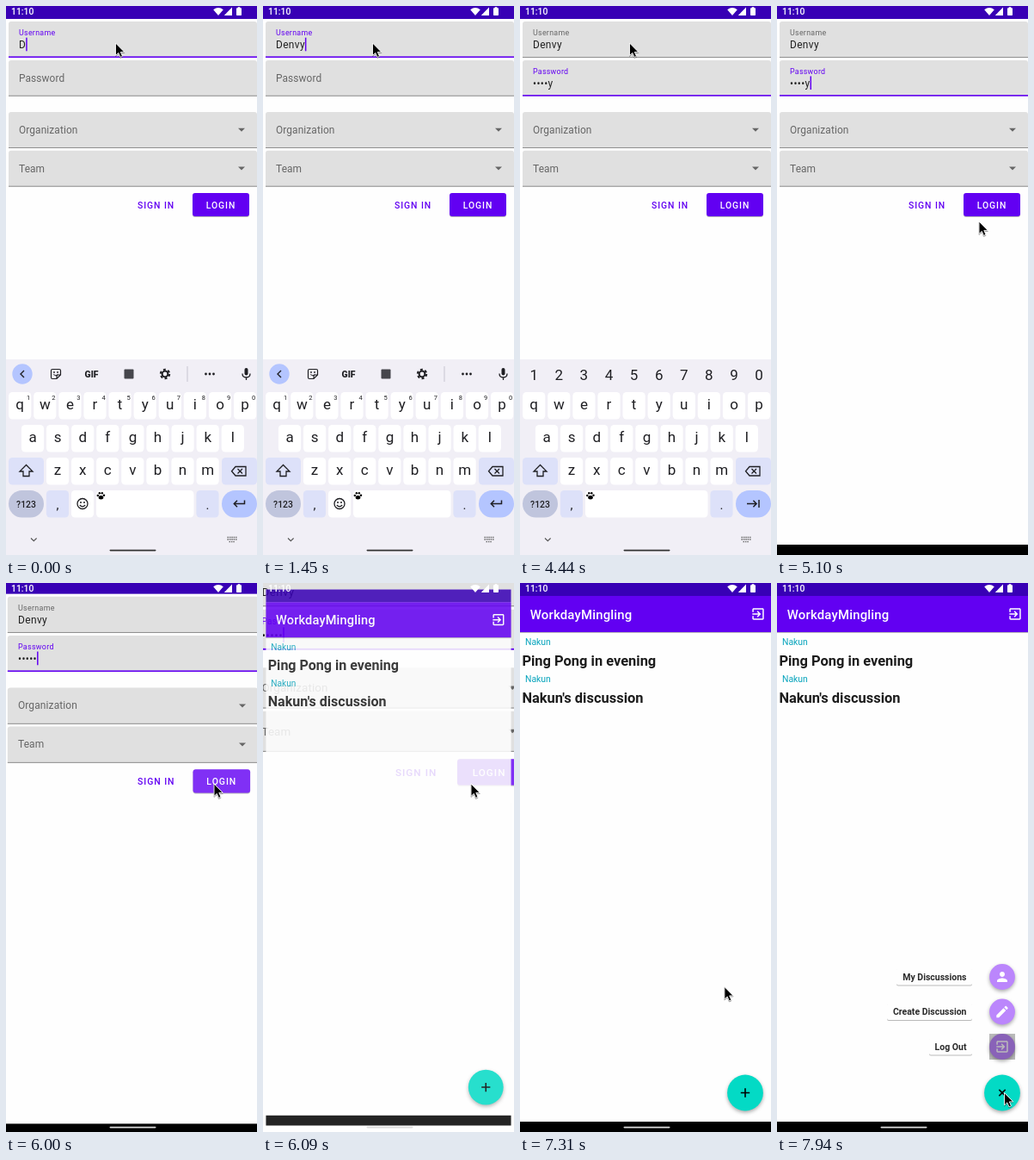
Recreate the animation shown at these times as an HTML page. Size 292x637 px, loop 8000 ms.

```html
<!DOCTYPE html>
<html lang="en">
<head>
<meta charset="utf-8">
<title>Login</title>
<style>
  html, body { margin: 0; width: 100%; height: 100%; overflow: hidden; background: #fefefe; }
  svg { display: block; }
  #stage { font-family: Roboto, sans-serif; }
  text { white-space: pre; }
  .mid { text-anchor: middle; }
  .end { text-anchor: end; }
  .raised { filter: drop-shadow(0 2px 2px #0005); }
  .card { filter: drop-shadow(0 1px .7px #0004); }
</style>
</head>
<body>
<svg id="stage" width="292" height="637" viewBox="0 0 292 637"></svg>
<script>
const LOOP = 8000;
const DP = 0.743;
const PURPLE = '#6200f2', DARK = '#3800b5', TEAL = '#03dac5', LILAC = '#bb86fc';
const INK = '#1f1f23', TONAL = '#dde1f9', BLUE = '#b4c5ff', LETTER_SPACE = 'letter-spacing=".031em"';
const NAME = 'Denvy';
const NAME_KEYS = [0, 260, 1040, 1190, 1450];
const FOCUS = 1720;
const PASS_KEYS = [2500, 2880, 3510, 3660, 3930];
const CURSOR = [
  [0, 127.5, 43], [4650, 127.5, 43], [5060, 235, 250], [5130, 235, 250], [5400, 242, 233],
  [6470, 242, 233], [6660, 190, 234], [6810, 190, 234], [6890, 188, 238],
  [7100, 188, 238], [7450, 264.5, 591.5]
];
const EXIT = 'M10.09 15.59L11.5 17l5-5-5-5-1.41 1.41L12.67 11H3v2h9.67zM19 3H5c-1.1 0-2 .9-2 2v4h2V5h14v14H5v-4H3v4c0 1.1.9 2 2 2h14c1.1 0 2-.9 2-2V5c0-1.1-.9-2-2-2z';
const PERSON = 'M12 12c2.2 0 4-1.8 4-4s-1.8-4-4-4-4 1.8-4 4 1.8 4 4 4zm0 2c-2.7 0-8 1.3-8 4v2h16v-2c0-2.7-5.3-4-8-4z';
const PENCIL = 'M3 17.25V21h3.75L17.8 9.94l-3.75-3.75zM20.7 7c.4-.4.4-1 0-1.4l-2.3-2.3c-.4-.4-1-.4-1.4 0l-1.9 1.8 3.75 3.75z';

const text = (x, y, size, str, attrs = '') =>
  `<text x="${x}" y="${y}" font-size="${size}" ${attrs}>${str}</text>`;
const rect = (x, y, w, h, fill, r = 0, attrs = '') =>
  `<rect x="${x}" y="${y}" width="${w}" height="${h}" fill="${fill}" rx="${r}" ${attrs}/>`;
const disc = (x, y, r, fill, attrs = '') =>
  `<circle cx="${x}" cy="${y}" r="${r}" fill="${fill}" ${attrs}/>`;
const line = (d, width = 1.4, color = INK) =>
  `<path d="${d}" fill="none" stroke="${color}" stroke-width="${width}"/>`;
const icon = (d, cx, cy, fill = '#fff') =>
  `<path d="${d}" fill="${fill}" transform="translate(${cx - 12 * DP} ${cy - 12 * DP}) scale(${DP})"/>`;
const group = (id, body, attrs = '') => `<g id="${id}" ${attrs}>${body}</g>`;

// Login screen
const box = (y, id) =>
  `<path d="M3 ${y + 42}V${y + 3}q0-3 3-3H289q3 0 3 3V${y + 42}z" fill="#e0e0e0"/>` +
  rect(3, y + 41, 289, 1, '#8f8f8f', 0, id ? `id="${id}"` : '');
const dropdown = (y, label) => box(y) +
  text(15, y + 24.8, 11.9, label, 'fill="#666" letter-spacing=".009em"') +
  `<path d="M270 ${y + 18.8}h8l-4 4z" fill="#666"/>`;

const login =
  rect(-20, -20, 332, 677, '#fefefe') + rect(-20, -20, 332, 35, DARK) +
  box(18, 'nameLine') + text(15, 34, 8.9, 'Username', `id="nameLabel" ${LETTER_SPACE}`) +
  text(15, 49, 11.9, '', `id="nameText" fill="#212121" ${LETTER_SPACE}`) +
  box(63, 'passLine') + text(15, 88, 11.9, 'Password', 'id="passLabel"') +
  text(15, 93.8, 11.9, '', `id="passText" fill="#212121" ${LETTER_SPACE}`) +
  rect(15, 36.7, 1.5, 15.6, PURPLE, 0, 'id="caret"') +
  dropdown(123, 'Organization') + dropdown(167.7, 'Team') +
  text(153, 234.7, 10.4, 'SIGN IN', `fill="${PURPLE}" font-weight="500" letter-spacing=".93"`) +
  rect(217, 217, 66, 27, PURPLE, 3, 'class="card"') +
  `<svg x="217" y="217" width="66" height="27">${disc(25, 16, 0, '#fff', 'id="ripple" opacity=".19"')}</svg>` +
  text(232.7, 234.7, 10.4, 'LOGIN', 'fill="#fff" font-weight="500" letter-spacing=".93"') +
  rect(-20, 625, 332, 40, '#000');

// Keyboard
const key = (cx, y, w, fill = '#fff', r = 4.5) => rect(cx - w / 2, y, w, 31.5, fill, r);
const letters = (str, x, y) => [...str].map((c, i) =>
  key(x + i * 29.1, y, 26.2) + text(x + i * 29.1, y + 20, 17, c, `class="mid" fill="${INK}"`)).join('');
const digits = (dx, y, size) => [...'1234567890'].map((c, i) =>
  text(16.2 + i * 29.1 + dx, y, size, c, `class="mid" fill="${INK}"`)).join('');
const paw = (x, y) => `<ellipse cx="${x + .5}" cy="${y + 2.2}" rx="2.8" ry="2.2"/>` +
  [[-3.2, 0], [-1.2, -2.8], [1.8, -2.8], [4, -.3]].map(([a, b]) => disc(x + a, y + b, 1.2, '#000')).join('');
const gear = disc(185, 427, 3.4, 'none', `stroke="${INK}" stroke-width="2"`) +
  disc(185, 427, 5.2, 'none', `stroke="${INK}" stroke-width="2" stroke-dasharray="2.9 2.55"`);

const toolbar =
  disc(19, 427, 11.7, BLUE) + line('M21 423l-4 4 4 4') +
  line('M63.5 428v-5q0-1.5-1.5-1.5h-8q-1.5 0-1.5 1.5v8q0 1.5 1.5 1.5h5zM63.5 428h-3q-1.5 0-1.5 1.5v3', 1.2) +
  disc(56, 425, .9, INK) + disc(60, 425, .9, INK) + line('M55.3 427.6q2.7 2.4 5.2 0', 1) +
  text(99.5, 430.7, 10.4, 'GIF', `class="mid" font-weight="800" fill="${INK}"`) +
  rect(137.5, 421.5, 11, 11, '#46464c', 1) + gear +
  rect(210.5, 418, 1, 18, '#c8c6d0') +
  [232.5, 237, 241.5].map(x => disc(x, 427, 1.4, INK)).join('') +
  rect(277.5, 420, 4, 8.5, INK, 2) + line('M275 426.5q0 4.5 4.5 4.5t4.5-4.5M279.5 431v3', 1.3) +
  digits(10, 456.5, 7.5);
const emoji = key(89, 562, 26.2) + disc(89, 577.5, 6, 'none', `stroke="${INK}" stroke-width="1.3"`) +
  disc(87, 576, 1, INK) + disc(91, 576, 1, INK) + line('M85.8 579q3.2 3.6 6.4 0', 1.2);

const keyboard =
  rect(0, 410, 292, 227, '#f1eff6') +
  letters('qwertyuiop', 16.2, 448) + letters('asdfghjkl', 31, 486) + letters('zxcvbnm', 60, 524) +
  key(23.5, 524, 41, TONAL) + line('M23.5 532.5l-7.5 7.5h4v5.5h7v-5.5h4z', 1.3) +
  key(271.5, 524, 41, TONAL) + line('M267 534.5h12v10.5h-12l-4.5-5.2zM269.5 537l5.5 5.5m0-5.5l-5.5 5.5', 1.3) +
  key(23.5, 562, 41, '#c0c5dd', 15.7) + text(23.5, 582, 10.4, '?123', `class="mid" font-weight="500" fill="${INK}"`) +
  key(60, 562, 26.2, TONAL) + text(60, 584, 15, ',', `class="mid" fill="${INK}"`) +
  key(234.5, 562, 26.2, TONAL) + text(234.5, 584, 15, '.', `class="mid" fill="${INK}"`) +
  key(271.5, 562, 41, BLUE, 15.7) +
  group('nameKeys', toolbar + emoji + rect(105, 562, 113.5, 31.5, '#fff', 4.5) + paw(110, 568) +
    line('M277.5 573.5v4h-12m3.5-3.7l-3.7 3.7 3.7 3.7', 1.5)) +
  group('passKeys', digits(0, 434, 17) + rect(76, 562, 142.5, 31.5, '#fff', 4.5) + paw(81.5, 568) +
    line('M264 577.5h11m-3.6-3.7l3.7 3.7-3.7 3.7M278 573v9', 1.5)) +
  line('M29 617.5l3.3 3.2 3.3-3.2', 1.1, '#555') +
  line('M257.5 616.5h11M257.5 619h11M259.5 621.7h7', 1.3, '#666').replace('/>', ' stroke-dasharray="1.5 .9"/>');

// Home screen
const post = (y, author, title) =>
  text(6, y, 10.4, author, 'fill="#0aa5bd"') +
  text(2.4, y + 24, 16.45, title, 'fill="#1c1c1c" font-weight="700"');
const MENU = [
  { y: 538, label: 'Log Out', w: 50, shape: EXIT },
  { y: 497.5, label: 'Create Discussion', w: 99, shape: PENCIL },
  { y: 457, label: 'My Discussions', w: 88, shape: PERSON }
];
const menuItem = ({ y, label, w, shape }, i) =>
  group('label' + i, rect(227 - w, y - 10, w, 19.5, '#fefefe', 2, 'class="card"') +
    text(220.5, y + 3.7, 10.5, label, 'class="end" font-weight="700" fill="#2a2a2a"')) +
  group('mini' + i, disc(262, y, 14.9, LILAC, 'class="raised"') + icon(shape, 262, y) +
    (i ? '' : rect(247, y - 15, 30, 30, '#000', 0, 'opacity=".27"')));

const home =
  rect(0, 0, 292, 637, '#fefefe') + rect(0, 15, 292, 42, PURPLE, 0, 'class="card"') + rect(0, 0, 292, 15, DARK) +
  text(11.8, 42, 14.9, 'WorkdayMingling', 'fill="#fff" font-weight="500" letter-spacing=".0125em"') +
  icon(EXIT, 277, 36) +
  post(72, 'Nakun', 'Ping Pong in evening') + post(115, 'Nakun', "Nakun's discussion") +
  MENU.map(menuItem).join('') +
  disc(262, 591.5, 20.9, TEAL, 'class="raised"') +
  group('plus', line('M256.8 591.5h10.4M262 586.3v10.4', 1.6, '#000')) +
  rect(0, 625, 292, 12, '#000');

const status =
  text(6, 10.3, 10.4, '11:10', 'fill="#fff" font-weight="500"') +
  '<path d="M241.2 4.2Q247 -.4 252.8 4.2L247 11zM263 1.5V11H253.8z" fill="#fff"/>' +
  rect(268, 2.2, 6, 8.8, '#fff', .8) + rect(269.7, 1.2, 2.6, 2, '#fff');

stage.innerHTML =
  group('loginScreen', login) + group('keyboard', keyboard) + group('homeScreen', home) + status +
  rect(120.5, 630.8, 54, 1.6, '#333', .8, 'id="pill"') +
  group('cursor', '<path d="M0 0V14.4L3.3 11.4L5.5 16.4L8 15.3L5.8 10.4H10.3z" stroke="#fff" stroke-width=".9" style="filter:drop-shadow(.5px 1px .7px #0006)"/>');

const $ = id => document.getElementById(id);
const set = (id, attrs) => { for (const k in attrs) $(id).setAttribute(k, attrs[k]); };
const show = (id, on) => set(id, { visibility: on ? 'visible' : 'hidden' });
const clamp = v => Math.max(0, Math.min(1, v));
const span = (t, from, to) => clamp((t - from) / (to - from));
const mix = (a, b, p) => a + (b - a) * p;
const smooth = p => p * p * (3 - 2 * p);
const easeOut = p => 1 - (1 - p) ** 3;
const zoom = (s, x, y) => `translate(${x} ${y}) scale(${s}) translate(${-x} ${-y})`;

// Window easing: a sharp start followed by a long settle, as two joined Bezier curves.
function windowEase(p) {
  const [xs, ys] = p < 1 / 6 ? [[0, .05, .1333, .1667], [0, 0, .06, .4]]
                             : [[.1667, .2083, .25, 1], [.4, .82, 1, 1]];
  const bezier = ([a, b, c, d], u) =>
    a * (1 - u) ** 3 + 3 * b * u * (1 - u) ** 2 + 3 * c * u * u * (1 - u) + d * u ** 3;
  let lo = 0, hi = 1;
  for (let i = 0; i < 20; i++) {
    const u = (lo + hi) / 2;
    if (bezier(xs, u) < p) lo = u; else hi = u;
  }
  return bezier(ys, lo);
}

function cursorAt(t) {
  const i = CURSOR.findLastIndex(k => k[0] <= t);
  const a = CURSOR[i], b = CURSOR[i + 1] || a;
  const p = a === b ? 0 : smooth(span(t, a[0], b[0]));
  return [mix(a[1], b[1], p), mix(a[2], b[2], p)];
}

function drawForm(t) {
  const onPass = t >= FOCUS;
  const typed = keys => keys.filter(k => k <= t).length;
  const n = typed(PASS_KEYS);
  const lastKey = [...NAME_KEYS, FOCUS, ...PASS_KEYS].findLast(k => k <= t);
  const hidden = t - lastKey < 1500 ? Math.max(0, n - 1) : n;
  $('nameText').textContent = NAME.slice(0, typed(NAME_KEYS));
  $('passText').textContent = '•'.repeat(hidden) + NAME.slice(hidden, n);

  const underline = (id, y, on) => set(id, on
    ? { y: y - 1.6, height: 1.6, fill: PURPLE } : { y: y - 1, height: 1, fill: '#8f8f8f' });
  underline('nameLine', 60, !onPass);
  underline('passLine', 104.7, onPass);
  set('nameLabel', { fill: onPass ? '#666' : PURPLE });
  const lift = smooth(span(t, FOCUS - 20, 1870));
  set('passLabel', {
    fill: onPass ? PURPLE : '#666', y: mix(88, 78.8, lift),
    'font-size': mix(11.9, 8.9, lift), 'letter-spacing': mix(.1, .27, lift)
  });

  const field = $(onPass ? 'passText' : 'nameText');
  const width = field.textContent ? field.getComputedTextLength() : 0;
  set('caret', { x: 15 + width, y: onPass ? 81.4 : 36.7 });
  show('caret', Math.floor((t - lastKey) / 495) % 2 === 0);
  set('ripple', { r: t < 5460 ? 0 : mix(8, 48, easeOut(span(t, 5460, 5700))) });

  show('nameKeys', !onPass);
  show('passKeys', onPass);
  const drop = span(t, 4750, 5000);
  set('keyboard', { transform: `translate(0 ${227 * smooth(drop)})` });
  show('keyboard', drop < 1);
}

function drawHome(t) {
  const open = t >= 6290 ? 1 : windowEase(span(t, 5970, 6370));
  set('loginScreen', { transform: zoom(1 + .15 * open, 146, 318.5) });
  set('homeScreen', { transform: zoom(.85 + .15 * open, 146, 318.5), opacity: span(t, 6020, 6103) });
  MENU.forEach(({ y }, i) => {
    const p = easeOut(span(t, 7665 + 25 * i, 7870 + 25 * i));
    set('mini' + i, { transform: zoom(p, 262, y), opacity: p });
    set('label' + i, { opacity: p });
  });
  set('plus', { transform: `rotate(${45 * smooth(span(t, 7665, 7900))} 262 591.5)` });
}

function draw(t) {
  drawForm(t);
  drawHome(t);
  const light = span(t, 5200, 5400);
  set('pill', { fill: t < 4950 ? '#333' : `rgb(${[0, 0, 0].map(() => Math.round(220 * light))})` });
  set('cursor', { transform: `translate(${cursorAt(t)})` });
}

const start = performance.now();
function tick() {
  draw((performance.now() - start) % LOOP);
  requestAnimationFrame(tick);
}
tick();
</script>
</body>
</html>
```
